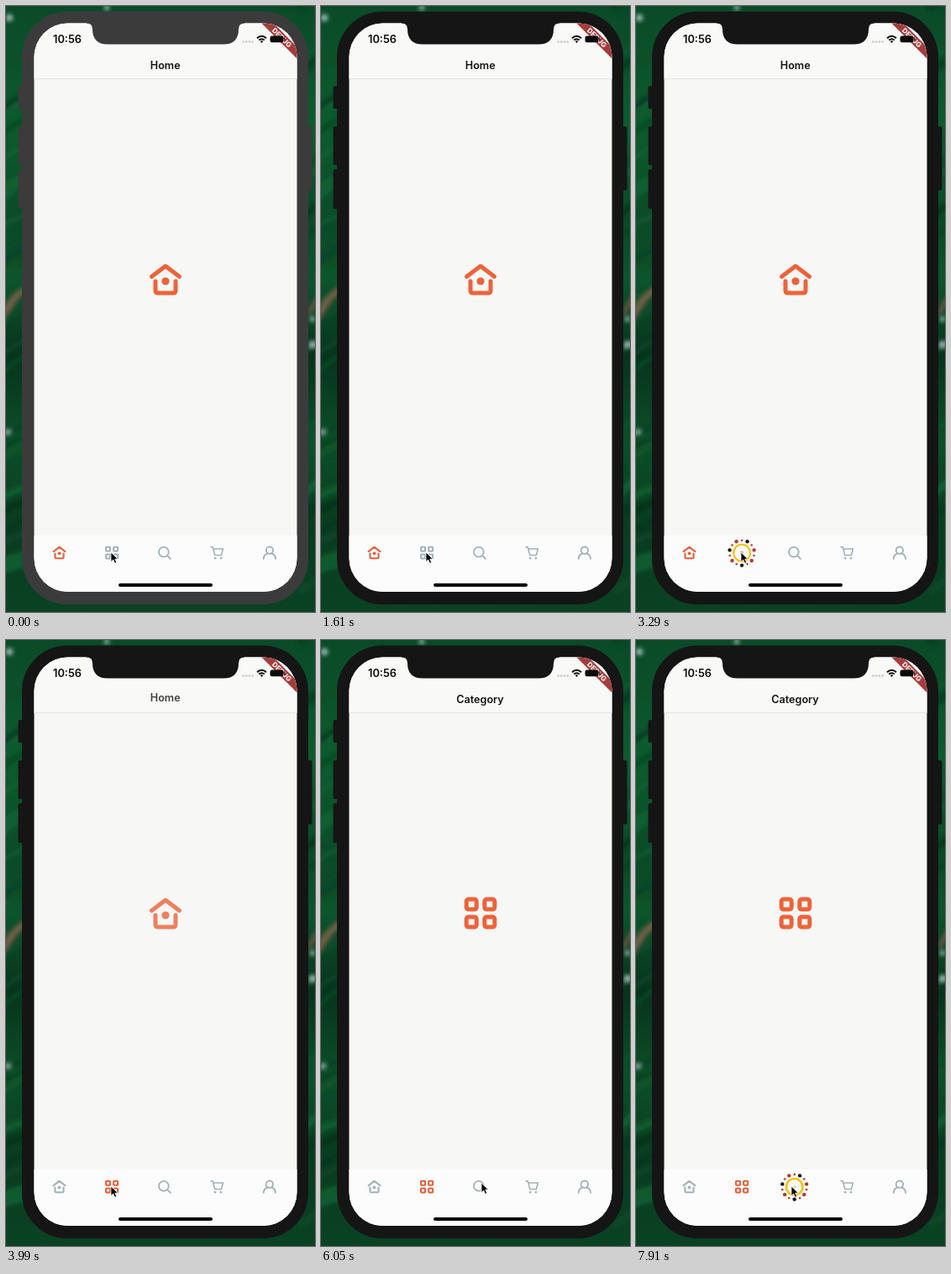
Recreate the animation shown at these times as an HTML page. Size 368 px wide and 720 px high, loop 8 s.

```html
<!DOCTYPE html>
<html lang="en">
<head>
<meta charset="utf-8">
<title>Tab bar</title>
<style>
  html, body { margin: 0; width: 100%; height: 100%; overflow: hidden; background: #0a4524; }
  svg { display: block; width: 368px; height: 720px; --bezel: #151515; }
  svg.bright { --bezel: #3b3b3c; }
  .bezel { fill: var(--bezel); }
  .icon { fill: none; stroke: currentColor; stroke-width: 5; stroke-linecap: round; stroke-linejoin: round; }
  .icon .solid { fill: currentColor; stroke: none; }
  .page { color: #ee6239; }
  text { font-family: Inter, Roboto, sans-serif; font-weight: 600; }
  .title { font-size: 12.6px; text-anchor: middle; fill: #131313; }
</style>
</head>
<body>
<svg id="stage" viewBox="0 0 368 720">
  <defs>
    <linearGradient id="green" x2="0" y2="1">
      <stop offset="0" stop-color="#0a4a28"/>
      <stop offset=".2" stop-color="#0c5c2e"/>
      <stop offset=".36" stop-color="#0a4a27"/>
      <stop offset=".45" stop-color="#0c552c"/>
      <stop offset=".58" stop-color="#07331c"/>
      <stop offset=".72" stop-color="#0b5029"/>
      <stop offset=".86" stop-color="#083c20"/>
      <stop offset="1" stop-color="#0a4224"/>
    </linearGradient>
    <filter id="soft"><feGaussianBlur stdDeviation="2.5"/></filter>
    <clipPath id="screen"><rect x="33.5" y="20.5" width="313" height="675.5" rx="40"/></clipPath>

    <g id="home" class="icon">
      <path d="M-16.5-3.5 0-16 16.5-3.5M-12 2V13q0 3 3 3H9q3 0 3-3V2"/>
      <circle class="solid" cy="2" r="4.6"/>
    </g>
    <g id="category" class="icon">
      <rect x="-16.8" y="-16.4" width="12" height="12" rx="2.5"/>
      <rect x="4.8" y="-16.4" width="12" height="12" rx="2.5"/>
      <rect x="-16.8" y="4.6" width="12" height="12" rx="2.5"/>
      <rect x="4.8" y="4.6" width="12" height="12" rx="2.5"/>
    </g>
    <g id="search" class="icon" style="stroke-width:4.4">
      <circle cx="-2" cy="-2" r="14"/><path d="M9 9 17 17"/>
    </g>
    <g id="cart" class="icon" style="stroke-width:3.8">
      <path d="M-17-16h5l6 23H12l5-18H-10"/>
      <circle class="solid" cx="-5" cy="15.5" r="3.4"/><circle class="solid" cx="11" cy="15.5" r="3.4"/>
    </g>
    <g id="person" class="icon" style="stroke-width:4.4">
      <circle cy="-7" r="10"/><path d="M-17 17C-17 8-11 4-6 2M17 17C17 8 11 4 6 2"/>
    </g>
  </defs>

  <rect width="368" height="720" fill="url(#green)"/>
  <g id="blades" filter="url(#soft)" stroke-linecap="round"></g>

  <g class="bezel">
    <rect x="14.5" y="95" width="8" height="27" rx="2"/>
    <rect x="14.5" y="143" width="8" height="46" rx="2"/>
    <rect x="14.5" y="194" width="8" height="47" rx="2"/>
    <rect x="356" y="143" width="8.5" height="76" rx="2"/>
    <rect x="19" y="6.5" width="341" height="704.5" rx="54"/>
  </g>

  <g clip-path="url(#screen)">
    <rect x="33" y="20" width="314" height="676" fill="#f7f7f6"/>
    <rect x="33" y="20" width="314" height="66" fill="#f9f9f8"/>
    <rect x="33" y="86" width="314" height="1" fill="#e4e4e3"/>
    <rect x="33" y="629" width="314" height="67" fill="#fcfcfc"/>

    <g class="page" id="homePage">
      <text class="title" x="189.7" y="75">Home</text>
      <use href="#home" x="190" y="325"/>
    </g>
    <g class="page" id="categoryPage">
      <text class="title" x="189.5" y="75">Category</text>
      <use href="#category" x="190" y="324.5"/>
    </g>

    <g id="tabs"></g>
    <g id="burst"><circle id="ring" fill="none"/></g>

    <g transform="translate(328.5 37.5) rotate(45)">
      <rect x="-40" y="-5" width="80" height="10" fill="#a53c3c"/>
      <text y="3" text-anchor="middle" font-size="8.3" style="font-weight:800" fill="#f8eeee">DEBUG</text>
    </g>
    <text x="56" y="44" font-size="12.8" fill="#0a0a0a">10:56</text>
    <path d="M281.5 42.5H295" stroke="#bdbdbd" stroke-width="2.2" stroke-dasharray="2.2 1.5"/>
    <g fill="none" stroke="#0a0a0a" stroke-width="2">
      <path d="M299 38.2Q304.5 33.4 310 38.2M301.2 40.6Q304.5 37.8 307.8 40.6"/>
      <path d="M302.8 41.9Q304.5 40.6 306.2 41.9L304.5 44Z" fill="#0a0a0a" stroke="none"/>
    </g>
    <rect x="314.5" y="35.5" width="16" height="7.8" rx="2.2" fill="#0a0a0a"/>
    <rect x="331.2" y="38" width="1.2" height="3" rx=".6" fill="#0a0a0a"/>
    <rect x="134" y="686" width="112" height="4" rx="2" fill="#060606"/>
  </g>
  <path class="bezel" d="M96 18V20.5Q103 20.5 103 27.5Q103 45.5 121 45.5H259Q277 45.5 277 27.5Q277 20.5 284 20.5V18Z"/>

  <path id="cursor" d="M0 0V11.4L2.7 8.9 4.6 13.2 6.7 12.3 4.8 8.1H8.3Z" fill="#000" stroke="#fff" stroke-width=".8"/>
</svg>

<script>
const LOOP = 8000, CATEGORY_TAP = 3005, SEARCH_TAP = 7640, LIKE_MS = 1000;
const SWITCH = CATEGORY_TAP + LIKE_MS;
const GRAY = '#a3b2b8', ORANGE = '#e4603c';
const BLACK = '#161616', RED = '#b23c2c';
const TABS = ['home', 'category', 'search', 'cart', 'person'];

const $ = id => document.getElementById(id);
const set = (el, attrs) => {
  for (const key in attrs) el.setAttribute(key, attrs[key]);
};
const add = (parent, tag, attrs) => {
  const el = document.createElementNS('http://www.w3.org/2000/svg', tag);
  set(el, attrs);
  return parent.appendChild(el);
};
const part = (v, from, to) => Math.min(1, Math.max(0, (v - from) / (to - from)));
const mix = (a, b, k) => a + (b - a) * k;
const ease = k => 1 - (1 - k) ** 2.3;
const smooth = k => k * k * (3 - 2 * k);
const overshoot = k => (k - 1) ** 2 * (3.5 * (k - 1) + 2.5) + 1;

// Blurred foliage
let seed = 11;
const random = () => (seed = seed * 16807 % 2147483647) / 2147483647;
const blade = (x, y, length, slope, stroke, width) => add($('blades'), 'path', {
  d: `M${x} ${y}q${length / 2} ${-slope} ${length} ${-slope * 1.4}`,
  fill: 'none', stroke, 'stroke-width': width
});
for (let i = 0; i < 50; i++) {
  const x = i % 3 ? -14 : 352;
  blade(x, random() * 730, 38, 8 + random() * 14,
    `hsl(${142 + random() * 10} 74% ${9 + random() * 15}% / .65)`, 3 + random() * 8);
}
blade(-4, 368, 26, 22, '#75604a', 7);
blade(362, 364, 12, 14, '#735444', 5);
[[2, 506, 3], [365, 402, 4], [365, 372, 3], [120, 2, 3], [4, 14, 4]].forEach(([cx, cy, r]) =>
  add($('blades'), 'circle', { cx, cy, r, fill: '#a4c4be' }));

const tabIcons = TABS.map(name => add($('tabs'), 'use', { href: '#' + name }));
const tabX = i => 63.5 + i * 62.6;

// Seven large dots with a small one between each pair
const dots = Array.from({ length: 14 }, (_, i) => {
  const large = i % 2 === 0;
  const fill = large && i % 4 ? BLACK : RED;
  return { large, angle: (38.6 + i * 180 / 7) * Math.PI / 180, el: add($('burst'), 'circle', { fill }) };
});

function drawBurst(p, x) {
  const active = p > 0 && p < 1;
  $('burst').style.display = active ? '' : 'none';
  if (!active) return;
  $('burst').setAttribute('transform', `translate(${x} 649.7)`);

  const outer = 11 * mix(.1, 1, ease(part(p, 0, .3)));
  const inner = Math.min(outer, 11 * mix(.2, 1, ease(part(p, .2, .5))));
  const tint = part(outer / 11, .5, 1);
  set($('ring'), {
    r: (outer + inner) / 2,
    'stroke-width': outer - inner,
    stroke: `rgb(${mix(255, 245, tint)} ${mix(87, 193, tint)} ${mix(34, 20, tint)})`
  });

  const b = 1 - (1 - part(p, .1, 1)) ** 2;
  for (const { large, angle, el } of dots) {
    const reach = large
      ? 17.6 * (b < .3 ? mix(0, .8, b / .3) : mix(.8, 1, part(b, .3, 1)))
      : 14.8 * part(b, 0, .3);
    const size = large
      ? 2.2 * (1 - part(b, .7, 1))
      : 2.2 * (b < .5 ? mix(1, .5, part(b, .2, .5)) : mix(.5, 0, part(b, .5, 1)));
    set(el, { cx: reach * Math.cos(angle), cy: reach * Math.sin(angle), r: b ? size : 0 });
  }
}

function drawTabs(t, p, tapped) {
  const selected = t < SWITCH ? 0 : 1;
  tabIcons.forEach((icon, i) => {
    const liking = i === tapped && p > 0 && p < 1;
    const scale = .42 * (liking ? mix(.2, 1, overshoot(part(p, .35, .7))) : 1);
    icon.style.color = liking || i === selected ? ORANGE : GRAY;
    icon.setAttribute('transform', `translate(${tabX(i)} 649.6) scale(${scale})`);
  });
}

function drawPages(t) {
  const leave = part(t, SWITCH, SWITCH + 190);
  const enter = part(t, SWITCH + 150, SWITCH + 400);
  const show = (page, opacity, shift) => {
    page.style.opacity = opacity;
    page.querySelector('text').setAttribute('transform', `translate(0 ${shift})`);
  };
  show($('homePage'), 1 - leave, -8 * leave);
  show($('categoryPage'), enter, 8 * (1 - smooth(enter)));
}

// time, x, y
const CURSOR_PATH = [
  [0, 125, 649], [4450, 125, 649], [4930, 177, 654],
  [5250, 191, 645], [6700, 191, 645], [7200, 185, 649], [LOOP + 100, 185, 649]
];
function drawCursor(t) {
  const i = CURSOR_PATH.findIndex(stop => stop[0] > t);
  const [t0, x0, y0] = CURSOR_PATH[i - 1], [t1, x1, y1] = CURSOR_PATH[i];
  const k = part(t, t0, t1);
  $('cursor').setAttribute('transform', `translate(${mix(x0, x1, k)} ${mix(y0, y1, k)})`);
}

// Playback shows three evenly spaced moments per 140 ms, held for 20, 20 and 100 ms.
function heldTime(t) {
  if (t < 30) return 0;
  const group = Math.floor((t - 30) / 140);
  const slot = Math.min(2, Math.floor((t - 30) % 140 / 20));
  return 30 + group * 140 + slot * 140 / 3;
}

const start = performance.now();
function draw() {
  const raw = (performance.now() - start) % LOOP;
  const t = heldTime(raw);
  const tapped = t < SWITCH ? 1 : 2;
  const p = (t - (tapped === 1 ? CATEGORY_TAP : SEARCH_TAP)) / LIKE_MS;
  $('stage').classList.toggle('bright', raw < 20);
  drawTabs(t, p, tapped);
  drawBurst(p, tabX(tapped));
  drawPages(t);
  drawCursor(t);
  requestAnimationFrame(draw);
}
draw();
</script>
</body>
</html>
```
